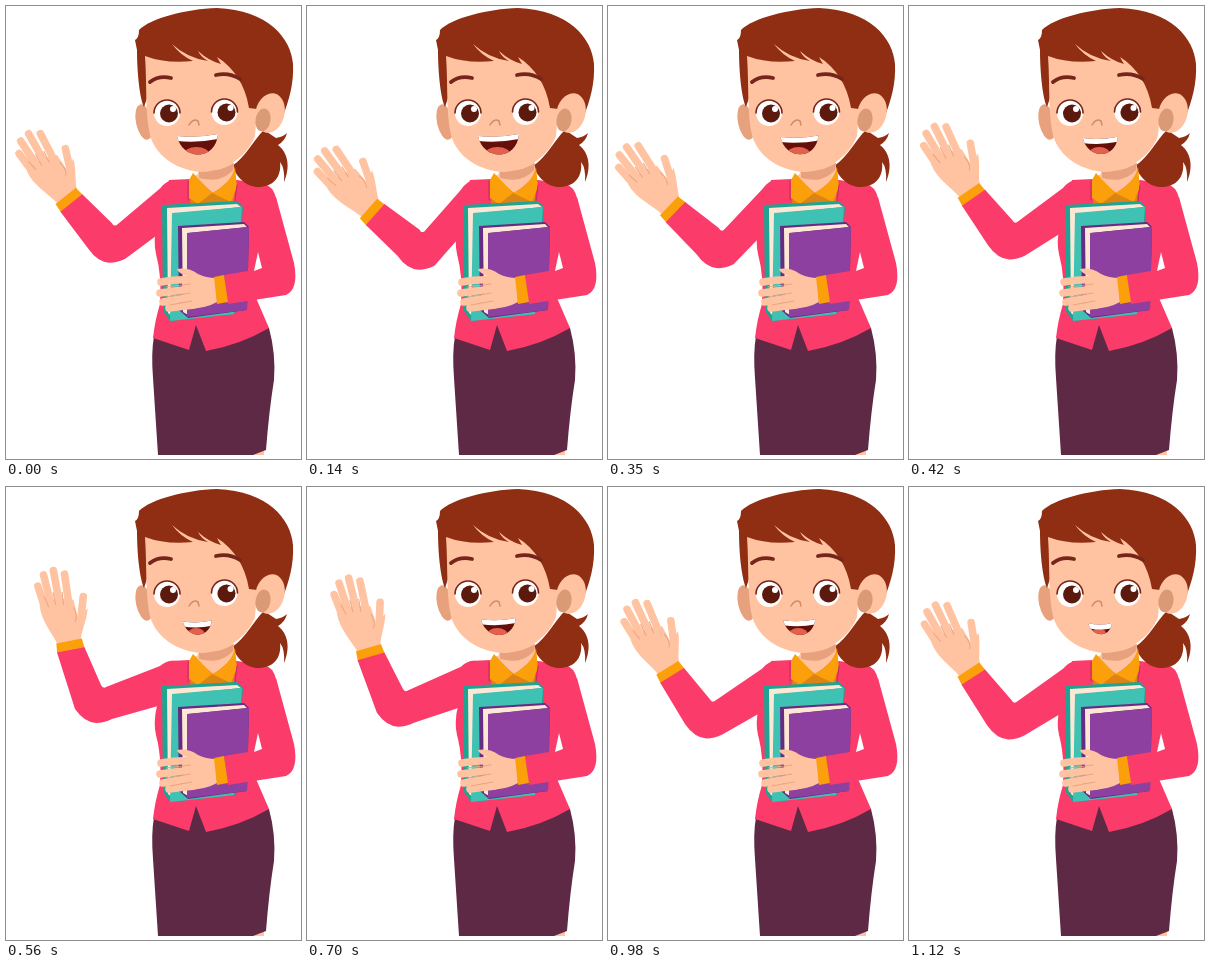
Write an HTML page that moves like this. It is 295 px wide and 453 px high and loops after 1.19 s.

```html
<!DOCTYPE html>
<html lang="en">
<head>
<meta charset="utf-8">
<title>Waving teacher</title>
<style>
  html, body { margin: 0; width: 100%; height: 100%; overflow: hidden; background: #fff; }
  svg { display: block; width: 295px; height: 453px; }
  .skin { fill: #ffc3a1; }
  .shade { fill: #e7a17c; }
  .hair { fill: #902e13; }
  .pink { fill: #fb3b6a; }
  .gold { fill: #fb9f0a; }
  .cream { fill: #fce8d5; }
  .line { fill: none; stroke-linecap: round; stroke-linejoin: round; }
  .crease { stroke: #eaa582; stroke-width: 1; }
  .finger { stroke: #ffc3a1; stroke-width: 7.6; }
</style>
</head>
<body>
<svg viewBox="0 0 295 453">
  <defs><clipPath id="mouthClip"><path id="mouthShape"/></clipPath></defs>

  <!-- skirt -->
  <path class="skin" d="M157 446H170V449H157ZM246 446L258 444V449H246Z"/>
  <path fill="#5d2944" d="M148 330Q145 347 147 372L152 449H247L260 444Q263 405 268 374Q270 348 263 322L200 318H180Z"/>

  <!-- waving arm -->
  <g id="hand">
    <path class="skin" d="M-29 -42C-28 -25 -17 -14 -11 1L11 1C9 -10 18 -24 19 -37L9 -28L5 -46L-10 -48Z"/>
    <path class="line finger" d="M-30 -61L-23 -36M-24 -72L-16 -36M-14 -76L-8 -36M-3 -72L1 -36M15 -49L12 -28"/>
    <path class="line crease" d="M-24 -50L-20 -40M-15 -54L-13 -42M-6 -54L-5 -42M5 -38Q9 -30 6 -24"/>
  </g>
  <path id="cuff" class="gold" d="M-13 -5H13L14 5H-14Z"/>
  <path id="sleeve" class="pink"/>

  <!-- jacket -->
  <path class="pink" d="M163 174L184 173L231 174L258 178Q267 180 270 192L280 250L250 292L263 322Q234 339 200 345L190 319L183 344L147 332Q149 314 154 298Q156 270 150 248Q147 234 151 219Z"/>

  <!-- ponytail -->
  <path class="hair" d="M226 160C240 151 248 133 258 124L270 132Q277 131 281 127Q279 135 272 139C283 148 284 162 278 176Q279 162 274 156C276 172 266 182 250 181Q236 179 228 164Z"/>

  <!-- neck and collar -->
  <path fill="#dc8413" d="M187 170L229 165L228 198H184Z"/>
  <path class="skin" d="M193 155H227L229 166Q222 178 207 187L189 172Q193 167 193 160Z"/>
  <path class="shade" d="M193 163Q211 168 228 157L227 164Q215 178 193 172Z"/>
  <path class="gold" d="M187 167L206 187L192 198L183 192V174ZM229 161L231 181L225 196L206 187Q225 178 229 161Z"/>
  <path class="line" stroke="#c82c58" d="M182 175V194M231 179L229 195"/>

  <!-- head -->
  <ellipse class="shade" cx="138" cy="116" rx="8" ry="18" transform="rotate(-12 138 116)"/>
  <path class="hair" d="M131 44L129 34Q133 32 133 24C145 12 180 3 211 2C262 4 285 32 287 58C288 78 283 94 277 110L250 118L141 92L138 101C133 90 131 62 131 44Z"/>
  <path class="skin" d="M139 50Q160 58 187 55Q174 49 166 38Q181 52 202 55Q195 51 192 45Q203 55 215 58Q213 55 211 51C228 62 239 78 243 102L251 103L249 130C241 151 220 165 196 166C174 165 150 152 144 129C139 108 141 78 139 50Z"/>
  <ellipse class="skin" cx="264" cy="107" rx="14.5" ry="20" transform="rotate(14 264 107)"/>
  <ellipse fill="#d99a75" cx="257" cy="114" rx="7.5" ry="11.5" transform="rotate(10 257 114)"/>
  <path class="line" stroke="#76251a" stroke-width="3.8" d="M144 76Q153 69 165 72M210 69Q223 66 234 73"/>

  <g id="eyes"></g>
  <path class="line" stroke="#d58a66" stroke-width="1.5" d="M183 119Q187 112 192 115L193 119"/>

  <g clip-path="url(#mouthClip)">
    <rect x="165" y="120" width="55" height="35" fill="#650f0a"/>
    <ellipse id="tongue" cy="149" ry="8" fill="#e3604f"/>
    <path id="teeth" class="line" stroke="#fff" stroke-width="10"/>
  </g>

  <!-- books -->
  <path fill="#1fa493" d="M156 199L231 195L237 201L229 308L164 315L157 305Z"/>
  <path class="cream" d="M161 202L231 198L235 201L167 208V311L162 307Z"/>
  <path fill="#3fc1b3" d="M166 207L236 201L228 308L164 315Z"/>
  <path fill="#662b82" d="M172 220L238 216L243 221L241 304L182 312L173 304Z"/>
  <path class="cream" d="M176 222L238 218L241 221L182 227V309L177 306Z"/>
  <path fill="#8d409f" d="M181 227L243 221L241 304L181 311Z"/>

  <!-- holding arm -->
  <path class="pink" d="M253 210L270 191L288 257Q293 283 280 289L222 298L218 269L248 264Z"/>
  <path fill="#fff" d="M252 246L256 262L248 265Z"/>
  <path class="skin" d="M210 272Q200 272 192 268Q182 261 171 263Q172 267 181 270L176 277L178 302Q197 304 211 296Z"/>
  <path class="line finger" stroke-width="6.6" d="M184 274Q172 273 155 276M184 283L154 287M185 291L157 296M188 299L163 302"/>
  <path class="line crease" d="M184 278L160 281M184 287L160 291M186 295L164 299"/>
  <path class="gold" d="M208 271L218 269L222 296L211 298Z"/>
</svg>

<script>
const STEP = 70, STEPS = 17;
const $ = id => document.getElementById(id);

// [step, value]: 0 is the raised arm, 1 the lowered arm
const liftKeys = [[0, 0.59], [4, 1], [8, 0], [9, -0.04], [12, 0.41], [16, 0.47]];
// [step, value]: 1 is the widest smile
const smileKeys = [[0, 1], [4, 1], [8, 0.3], [12, 0.95], [16, 0]];

function valueAt(keys, step) {
  const next = Math.max(1, keys.findIndex(([at]) => at >= step));
  const [a, from] = keys[next - 1], [b, to] = keys[next];
  return from + (to - from) * (step - a) / (b - a);
}

function drawArm(drop) {
  const bend = Math.max(0, drop) ** 1.6;
  const cx = 64 - 12 * drop + 17 * drop * drop, cy = 159 + 59 * drop;
  const cuffAngle = -11 - 47 * drop, handAngle = -2 - 32 * drop;
  const ix = 97 + 25 * bend, iy = 201 + 32 * drop;
  const ox = 90 + 31 * bend, oy = 236 + 35 * drop;

  const rad = cuffAngle * Math.PI / 180, c = Math.cos(rad), s = Math.sin(rad);
  const onCuff = (x, y) => `${cx + x * c - y * s} ${cy + x * s + y * c}`;
  const place = (id, angle) => $(id).setAttribute('transform', `translate(${cx} ${cy}) rotate(${angle})`);
  place('hand', handAngle);
  place('cuff', cuffAngle);
  $('sleeve').setAttribute('d',
    `M170 174Q161 173 154 ${179 + drop * 6}L${ix + 3} ${iy - 1}Q${ix} ${iy + 1} ${ix - 2} ${iy - 3}` +
    `L${onCuff(14, 4)}L${onCuff(-14, 4)}L${ox - 21} ${oy - 14}Q${ox - 12} ${oy - 1} ${ox} ${oy}` +
    `Q${ox + 8} ${oy} ${ox + 16} ${oy - 4}L152 ${219 + drop * 16}L176 205Z`);
}

function drawMouth(smile) {
  const lx = 179 - 8 * smile, ly = 136 - 6 * smile;
  const rx = 203 + 9 * smile, ry = 136 - 8 * smile;
  const mid = (lx + rx) / 2, lip = (ly + ry) / 2 + 3, chin = 151 + smile * 4;
  const topLip = `M${lx} ${ly}Q${mid} ${lip} ${rx} ${ry}`;
  $('mouthShape').setAttribute('d', `${topLip}C${rx - 2} ${chin} ${lx + 5} ${chin} ${lx} ${ly}Z`);
  $('teeth').setAttribute('d', topLip);
  $('tongue').setAttribute('cx', mid - 1);
  $('tongue').setAttribute('rx', (rx - lx) * 0.32);
}

const eye = (x, y) => `<circle cx="${x}" cy="${y}" r="13" fill="#fff"/>
  <path class="line" stroke="#76251a" stroke-width="1.6" d="M${x - 13} ${y}A13 13 0 0 1 ${x + 13} ${y}"/>
  <circle cx="${x + 2}" cy="${y + 0.5}" r="9" fill="#5b1a0d"/>
  <circle cx="${x + 6}" cy="${y - 4}" r="3" fill="#fff"/>`;
$('eyes').innerHTML = eye(161, 107) + eye(218.5, 106);

const start = performance.now();
function render() {
  const step = Math.floor((performance.now() - start) / STEP) % STEPS;
  drawArm(valueAt(liftKeys, step));
  drawMouth(valueAt(smileKeys, step));
  requestAnimationFrame(render);
}
render();
</script>
</body>
</html>
```
